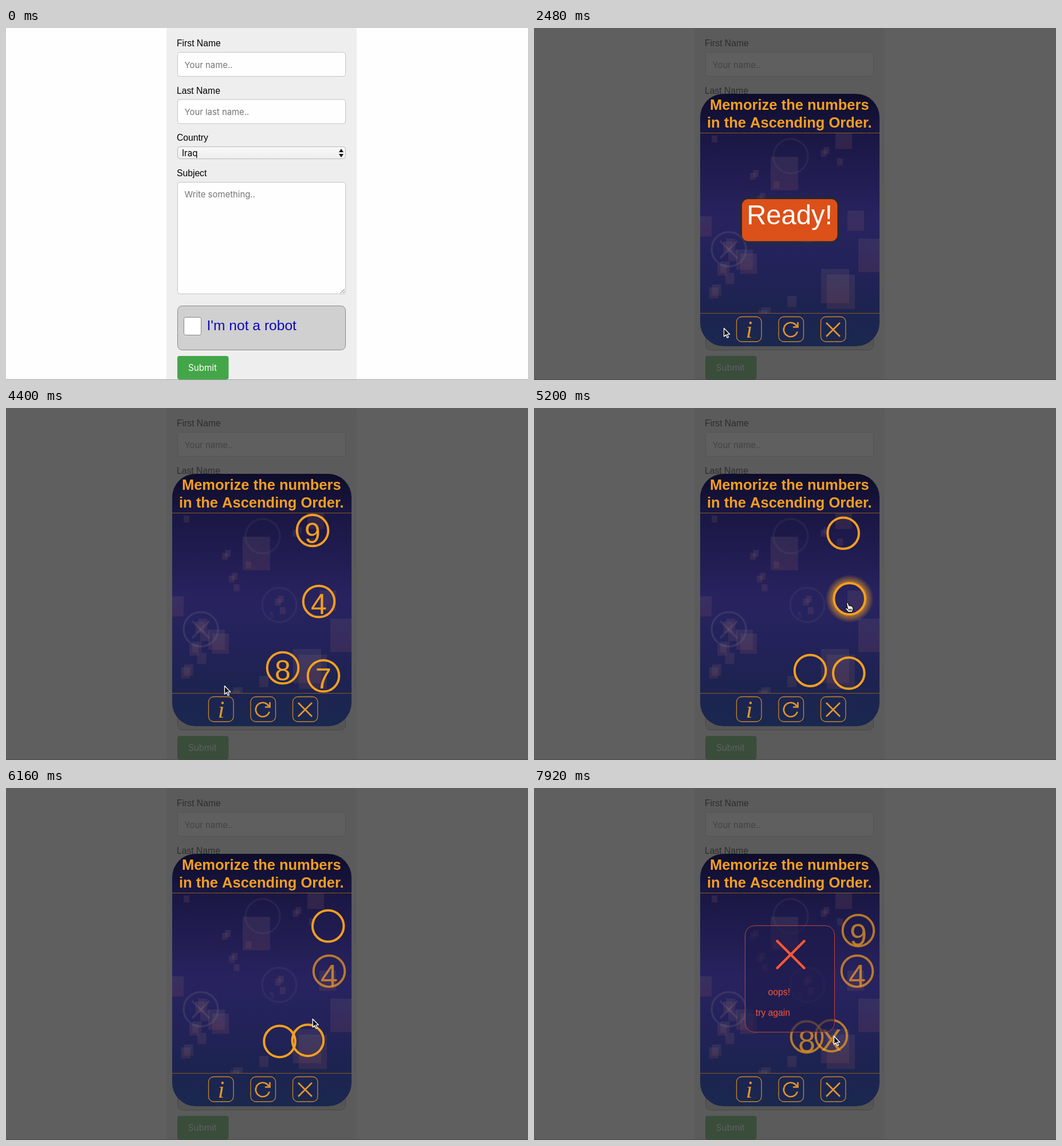
An HTML page with a canvas for the animation above (8000 ms loop, 911 by 615 pixels).

```html
<!DOCTYPE html>
<html lang="en">
<head>
<meta charset="utf-8">
<title>Memory captcha</title>
<style>
  html, body { margin: 0; width: 100%; height: 100%; overflow: hidden; background: #fefefe; }
  canvas { display: block; }
</style>
</head>
<body>
<canvas id="stage" width="911" height="615"></canvas>
<script>
const ctx = document.getElementById('stage').getContext('2d');
const LOOP = 8000;
const OPEN = 2480, DEAL = 3360, HIDE = 5000, RIGHT_CLICK = 5770, WRONG_CLICK = 6500, POPUP = 6640;
const ARIAL = '"Liberation Sans", Arial, sans-serif';
const UI = 'Inter, sans-serif';
const ORANGE = '#f59f1f';
const SPEED = 0.0234, RIGHT_WALL = 568;

// Rings drift diagonally once hidden and turn back at the wall or their floor
const rings = [
  { label: '9', x: 535, y: 214, dx: 1, dy: 1 },
  { label: '4', x: 546, y: 338, dx: 1, dy: -1, solved: true },
  { label: '8', x: 483, y: 454, dx: -0.2, dy: 1, floor: 462 },
  { label: '7', x: 554, y: 468, dx: -1, dy: -1, missed: true }
];
const pointerPath = [
  { t: 850, x: 425, y: 618 }, { t: 1750, x: 331, y: 524 }, { t: 3900, x: 331, y: 524 },
  { t: 4400, x: 381, y: 485 }, { t: 5400, x: 566, y: 323 }, { t: 5800, x: 566, y: 323 },
  { t: 6350, x: 523, y: 433 }
];

const clamp = k => Math.max(0, Math.min(1, k));
const smooth = k => k * k * (3 - 2 * k);
const reflect = (v, limit) => v > limit ? 2 * limit - v : v;

function pointerAt(t) {
  let { x, y } = pointerPath[0];
  pointerPath.slice(1).forEach((to, i) => {
    const from = pointerPath[i];
    const k = smooth(clamp((t - from.t) / (to.t - from.t)));
    x += (to.x - from.x) * k;
    y += (to.y - from.y) * k;
  });
  return [x, y];
}

function ringAt({ x, y, dx, dy, floor = 469, solved }, t) {
  const end = solved ? RIGHT_CLICK : WRONG_CLICK;
  const d = SPEED * Math.max(0, Math.min(t, end) - HIDE);
  return [reflect(x + dx * d, RIGHT_WALL), reflect(y + dy * d, floor)];
}

function seeded(seed) {
  return () => (seed = (seed * 16807) % 2147483647) / 2147483647;
}

function box(x, y, w, h, r, fill, stroke) {
  ctx.beginPath();
  ctx.roundRect(x, y, w, h, r);
  if (fill) { ctx.fillStyle = fill; ctx.fill(); }
  if (stroke) { ctx.strokeStyle = stroke; ctx.stroke(); }
}

function text(str, x, y, font, color, align = 'left') {
  ctx.font = font;
  ctx.fillStyle = color;
  ctx.textAlign = align;
  ctx.fillText(str, x, y);
}

function line(...points) {
  ctx.beginPath();
  points.forEach(([x, y]) => ctx.lineTo(x, y));
  ctx.stroke();
}

function circle(x, y, r, color, width) {
  ctx.beginPath();
  ctx.arc(x, y, r, 0, 7);
  ctx.strokeStyle = color;
  ctx.lineWidth = width;
  ctx.stroke();
}

function cross(x, y, r, color, width) {
  ctx.strokeStyle = color;
  ctx.lineWidth = width;
  line([x - r, y - r], [x + r, y + r]);
  line([x + r, y - r], [x - r, y + r]);
}

function gradient(y0, y1, ...colors) {
  const g = ctx.createLinearGradient(0, y0, 0, y1);
  colors.forEach((c, i) => g.addColorStop(i / (colors.length - 1), c));
  return g;
}

// Runs a drawing with its own canvas state
function scoped(settings, draw) {
  ctx.save();
  Object.assign(ctx, settings);
  draw();
  ctx.restore();
}

function drawForm(hover) {
  const label = (str, y) => text(str, 298, y, `15.7px ${ARIAL}`, '#000');
  const hint = (str, y) => text(str, 311.5, y, `14.9px ${UI}`, '#757575');
  const field = (y, h) => box(299.5, y, 293, h, 4, '#fefefe', '#c4c4c4');
  ctx.lineWidth = 1;
  box(280, -1, 332, 630, 5, '#eee');
  label('First Name', 32);
  field(42.5, 42);
  hint('Your name..', 70);
  label('Last Name', 115);
  field(125, 42);
  hint('Your last name..', 152);
  label('Country', 197);
  box(299.5, 207.5, 293, 21, 4, gradient(207, 229, '#f8f8f8', '#eee'), '#b8b8b8');
  text('Iraq', 307, 224, `15.2px ${UI}`, '#000');
  label('Subject', 259);
  field(269.5, 195);
  hint('Write something..', 296);

  ctx.fillStyle = '#111';
  for (const way of [-1, 1]) {
    ctx.beginPath();
    ctx.moveTo(581, 218.5 + way * 1.5);
    ctx.lineTo(585, 218.5 + way * 7.5);
    ctx.lineTo(589, 218.5 + way * 1.5);
    ctx.fill();
  }
  ctx.strokeStyle = '#666';
  line([584, 463], [591, 456]);
  line([588, 463], [591, 460]);

  box(299.5, 485.5, 293, 77, 8, '#d0d0d0', '#8a8a8a');
  scoped({ shadowColor: hover ? '#333' : 'transparent', shadowBlur: 8 },
    () => box(310.5, 505.5, 30, 31, 3, '#fff', hover ? '#aaa' : '#858585'));
  text("I'm not a robot", 350.5, 528, `24.6px ${ARIAL}`, '#0b09b4');
  box(299, 573, 89.5, 41, 4, '#43a648');
  text('Submit', 318, 599, `15.2px ${UI}`, '#fff');
  ctx.fillStyle = '#999';
  ctx.fillRect(0, 614, 911, 1);
}

// A block and its copies, each one shifted diagonally
function drawBlock(x, y, w, copies = 1, shift = 0) {
  const h = w * 1.22;
  for (let i = 0; i < copies; i++) {
    const top = y + Math.abs(shift) * i;
    ctx.fillStyle = gradient(top, top + h, 'rgba(110,95,115,.22)', 'rgba(125,70,85,.24)');
    ctx.fillRect(x + shift * i, top, w, h);
  }
}

function drawBlocks() {
  drawBlock(413, 225, 48);
  drawBlock(501, 421, 49, 2, 10);
  drawBlock(566, 368, 48);
  drawBlock(353, 387, 29, 2, 7);
  drawBlock(526, 176, 29);
  drawBlock(547, 319, 29);
  drawBlock(281, 329, 29);
  const random = seeded(29);
  for (let i = 0; i < 16; i++) {
    const x = 310 + 240 * random(), y = 188 + 20 * i;
    drawBlock(x, y, y > 360 ? 16 : 10, i % 2 + 1, -5);
  }
}

function drawBackdrop() {
  const faint = 'rgba(120,110,125,.13)', mark = 'rgba(120,115,130,.23)';
  box(290, 115, 313, 441, 41,
    gradient(115, 556, '#0e0c2a', '#1a1744', '#211d52', '#28235f', '#23225a', '#1d2350', '#1a284f'));
  scoped({}, () => {
    ctx.beginPath();
    ctx.rect(290, 184, 313, 314);
    ctx.clip();
    drawBlocks();
    circle(448, 224, 30, faint, 3.5);
    circle(477, 344, 30, faint, 3.5);
    text('5', 460, 367, `14px ${ARIAL}`, mark);
    circle(340, 386.5, 30, mark, 3.5);
    cross(340, 387, 15, mark, 3.5);
  });
  ctx.fillStyle = '#8d5a25';
  ctx.fillRect(290, 183, 313, 1);
  ctx.fillRect(290, 498, 313, 1);
}

function drawControls() {
  const title = `bold 25.5px ${ARIAL}`, icon = '#e3962e';
  text('Memorize the numbers', 445.8, 143, title, ORANGE, 'center');
  text('in the Ascending Order.', 445.8, 174, title, ORANGE, 'center');
  ctx.lineWidth = 1.3;
  for (let i = 0; i < 3; i++) box(353.5 + 73.5 * i, 504.5, 43.5, 43.5, 9, null, '#c98529');
  text('i', 375.5, 541, 'italic 42px "Liberation Serif", serif', icon, 'center');
  cross(522, 527, 12, icon, 2.6);
  ctx.beginPath();
  ctx.arc(448, 527, 12.2, 0.3, -0.5);
  ctx.stroke();
  line([460.5, 514], [460.5, 522.5], [452, 522.5]);
}

function drawGlow(x, y) {
  const glow = ctx.createRadialGradient(x, y, 28, x, y, 42);
  glow.addColorStop(0, 'rgba(245,159,31,.65)');
  glow.addColorStop(1, 'rgba(245,159,31,0)');
  ctx.beginPath();
  ctx.arc(x, y, 42, 0, 7);
  ctx.arc(x, y, 28, 0, 7);
  ctx.fillStyle = glow;
  ctx.fill('evenodd');
}

function drawRing(ring, t) {
  const [x, y] = ringAt(ring, t);
  const revealed = t >= (ring.solved ? RIGHT_CLICK : WRONG_CLICK);
  const hovered = !revealed && t > HIDE && Math.hypot(x - pointerAt(t)[0], y - pointerAt(t)[1]) < 29;
  if (hovered) drawGlow(x, y);
  scoped({ globalAlpha: revealed ? 0.7 : 1 }, () => {
    circle(x, y, 27.3, ORANGE, 4);
    if (t < HIDE) text(ring.label, x, y + 22, `50px ${ARIAL}`, ORANGE, 'center');
    else if (revealed) text(ring.missed ? 'X' : ring.label, x, y + 26, `54px ${ARIAL}`, ORANGE, 'center');
  });
  return hovered;
}

function drawReady(alpha) {
  scoped({ globalAlpha: alpha }, () => {
    scoped({ shadowColor: '#24300c', shadowBlur: 10 }, () => box(363, 299, 166.5, 73.5, 11, '#dc5019'));
    text('Ready!', 446, 343, `47.2px ${ARIAL}`, '#fff', 'center');
  });
}

function drawPopup(alpha) {
  const red = '#ff5634';
  scoped({ globalAlpha: alpha, lineCap: 'round', lineWidth: 1 }, () => {
    box(368.5, 240.5, 156, 186, 16, 'rgba(29,25,74,.6)', '#c3433a');
    cross(448, 291, 23.5, red, 4.5);
    text('oops!', 447, 362, `15.7px ${ARIAL}`, red, 'right');
    text('try again', 447, 398, `15.7px ${ARIAL}`, red, 'right');
  });
}

function drawPointer(t, hand) {
  const [x, y] = pointerAt(t);
  const outline = hand
    ? 'M-1.5 1.5Q0-1 1.5 1.5L3 6Q5 4.5 6 6.5Q8 5.5 9 8Q10 7.5 10 12L8.5 17H1.5L-4 10.5Q-3-9 .5 11Z'.replace('-3-9', '-3 8')
    : 'M.5.5V15L4 12L6.2 17.2L8.4 16.3L6.2 11.2L10.6 11Z';
  const path = new Path2D(outline);
  scoped({ lineJoin: 'round', lineWidth: 1.3 }, () => {
    ctx.translate(x, y);
    ctx.fillStyle = hand ? '#fff' : '#0a0a12';
    ctx.strokeStyle = hand ? '#111' : '#fff';
    ctx.fill(path);
    ctx.stroke(path);
    if (hand) for (let bar = 2.5; bar < 8; bar += 2.2) line([bar, 11], [bar, 14.5]);
  });
}

function draw(t) {
  let hand = t > 1700 && t < OPEN;
  ctx.fillStyle = '#fefefe';
  ctx.fillRect(0, 0, 911, 615);
  drawForm(hand);
  if (t >= OPEN) {
    ctx.fillStyle = 'rgba(55,55,55,.8)';
    ctx.fillRect(0, 0, 911, 615);
    drawBackdrop();
    drawControls();
    if (t >= DEAL) hand = rings.map(ring => drawRing(ring, t)).some(Boolean);
    if (t < DEAL + 160) drawReady(1 - clamp((t - DEAL) / 160));
    if (t > POPUP) drawPopup(clamp((t - POPUP) / 650));
  }
  if (t > pointerPath[0].t) drawPointer(t, hand);
}

const start = performance.now();
function tick() {
  draw((performance.now() - start) % LOOP);
  requestAnimationFrame(tick);
}
tick();
</script>
</body>
</html>
```
